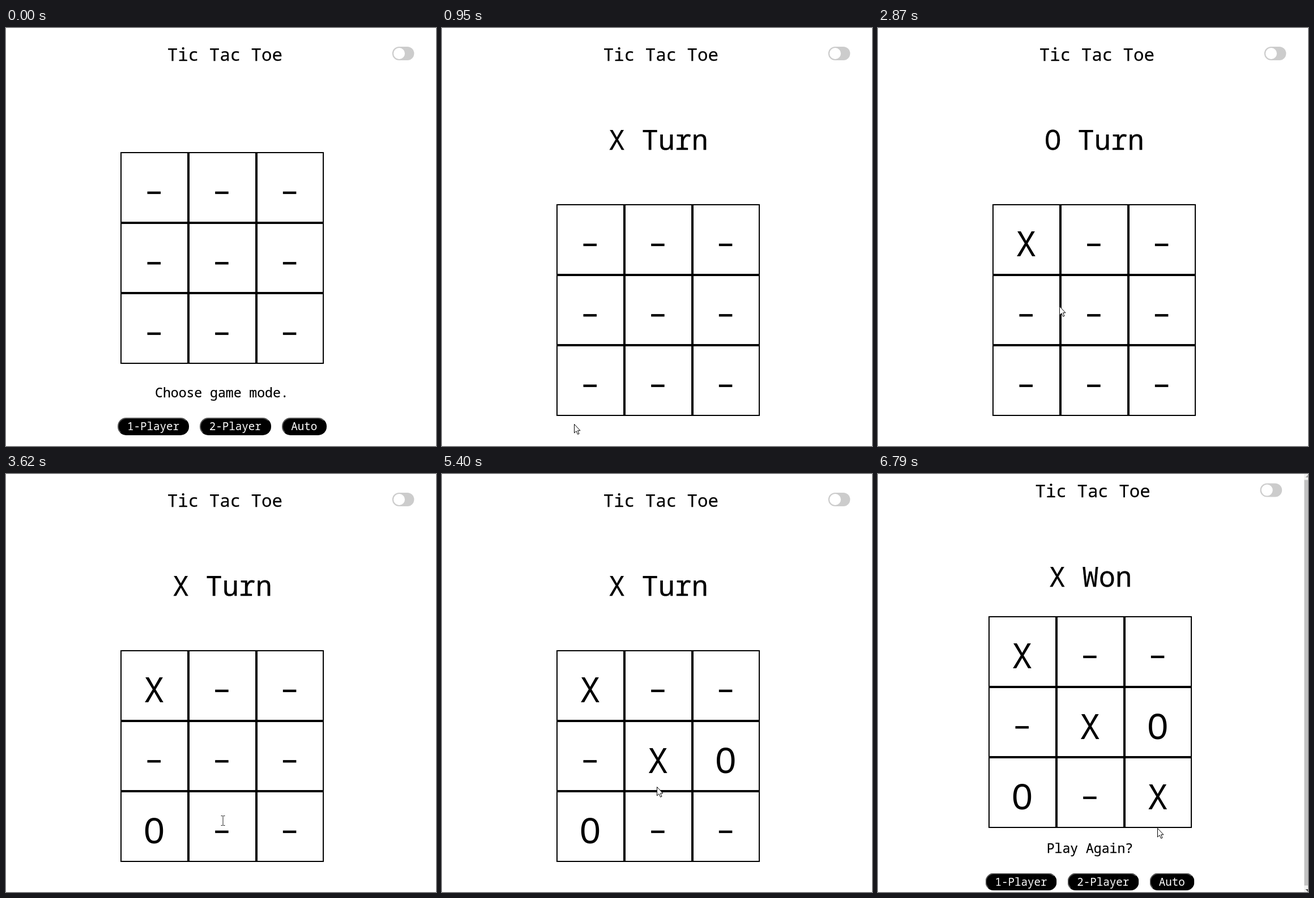
Animation of 759x738 px, one loop 8000 ms. Source, as an HTML page:

```html
<!DOCTYPE html>
<html lang="en">
<head>
<meta charset="utf-8">
<title>Tic Tac Toe</title>
<style>
  html, body { margin: 0; width: 100%; height: 100%; overflow: hidden; background: #fff; }
  svg { position: absolute; left: 0; top: 0; display: block; }
  text, .btn { font-family: "Roboto Mono", "Noto Sans Mono", monospace; white-space: pre; }
  .medium { font-weight: 500; stroke: #000; stroke-width: .25px; }
  #title { font-size: 30.8px; }
  #status { font-size: 48.8px; }
  #prompt { font-size: 23.1px; }
  .mark { font-size: 61.6px; text-anchor: middle; }
  #buttons { position: absolute; left: 0; top: 688px; }
  .btn {
    position: absolute; top: 0; box-sizing: border-box; height: 30.5px;
    border: 2px outset #000; border-radius: 15px; background: #000; color: #fff;
    font-size: 19.2px; line-height: 26.5px; text-align: center;
  }
</style>
</head>
<body>
<svg width="759" height="738" viewBox="0 0 759 738">
  <g id="header">
    <text id="title" class="medium" x="284.8" y="57.5">Tic Tac Toe</text>
    <rect x="681.8" y="33" width="38.6" height="24" rx="12" fill="#ccc"/>
    <circle cx="694" cy="45" r="10" fill="#fff"/>
  </g>
  <text id="status" class="medium" y="215"></text>
  <g id="board"></g>
  <text id="prompt" class="medium"></text>
  <g id="scrollbar">
    <rect x="752" width="7" height="738" fill="#f1f1f1"/>
    <rect x="752.5" y="10.5" width="6.5" height="716" fill="#c1c1c1"/>
    <path d="M754.5 6L759 1.5V6Z" fill="#a3a3a3"/>
    <path d="M754.5 733L759 737.5V733Z" fill="#505050"/>
  </g>
</svg>
<div id="buttons">
  <div class="btn" style="left:197px;width:126px">1-Player</div>
  <div class="btn" style="left:342px;width:125.5px">2-Player</div>
  <div class="btn" style="left:486.5px;width:79.5px">Auto</div>
</div>
<svg width="759" height="738" viewBox="0 0 759 738">
  <g id="cursor">
    <circle id="glow" r="11.7" fill="#ff0" opacity=".52"/>
    <path id="arrow" d="M.5 .5V16L4 12.7L6.6 18.4L9 17.3L6.5 11.8H11Z" fill="#fff" stroke="#000"/>
    <path id="beam" d="M-1.5 -7.5H1.5M5.5 -7.5H2.5M2 -7V9M-1.5 9.5H1.5M5.5 9.5H2.5" fill="none" stroke="#222"/>
  </g>
</svg>
<script>
const LOOP = 8000, START = 950, END = 6790;
const COL = 119.67, ROW = 124.4, BASELINE = 92.3;
const NS = "http://www.w3.org/2000/svg";
const $ = id => document.getElementById(id);

// Cell index, time and mark of each turn
const turns = [
  [0, 2280, "X"], [6, 3290, "O"], [4, 4410, "X"], [5, 5400, "O"], [8, END, "X"]
];
// Time span in which the pointer is pressed
const clicks = [[820, START], [2140, 2280], [4270, 4410], [6650, END]];
// First step, last step, number of steps, end point
const moves = [
  [420, 680, 5, 233, 698.5],
  [1280, 2010, 11, 262.5, 390.5],
  [2540, 3220, 11, 396, 622],
  [3620, 3620, 1, 380.5, 611],
  [3690, 4210, 9, 374, 497],
  [4740, 5330, 9, 379, 551.5],
  [5860, 6260, 7, 492.5, 624.5]
];

function add(tag, attrs, parent) {
  const el = document.createElementNS(NS, tag);
  for (const key in attrs) el.setAttribute(key, attrs[key]);
  return parent.appendChild(el);
}

function buildBoard() {
  const board = $("board");
  for (const [pos, size] of [[0, 2], [118, 4], [238, 4], [357, 2]])
    add("rect", { x: 202 + pos, y: 0, width: size, height: 374 }, board);
  for (const [pos, size] of [[0, 2], [123, 4], [247, 4], [372, 2]])
    add("rect", { x: 202, y: pos, width: 359, height: size }, board);
  return Array.from({ length: 9 }, (_, i) => {
    const x = 261.5 + i % 3 * COL, y = BASELINE + Math.floor(i / 3) * ROW;
    return {
      dash: add("rect", { x: x - 12, y: y - 22.6, width: 23.5, height: 4.4 }, board),
      mark: add("text", { class: "mark", x, y }, board)
    };
  });
}

const cells = buildBoard();
const show = (el, on) => { el.style.display = on ? "" : "none"; };
const shift = (el, x, y) => el.setAttribute("transform", `translate(${x} ${y})`);
const smooth = u => u * u * (3 - 2 * u);

function pointer(t) {
  let x = 421, y = 738;
  for (const [from, to, steps, endX, endY] of moves) {
    if (t < from) break;
    const gap = steps > 1 ? (to - from) / (steps - 1) : 1;
    const step = Math.min(steps, Math.floor((t - from) / gap + 1e-6) + 1);
    const u = smooth(step / steps);
    x += (endX - x) * u;
    y += (endY - y) * u;
  }
  return [x, y];
}

function overText(x, y, top) {
  const col = Math.floor((x - 202) / COL), row = Math.floor((y - top) / ROW);
  if (col < 0 || col > 2 || row < 0 || row > 2) return false;
  const dx = x - 261.5 - col * COL, dy = y - top - BASELINE - row * ROW;
  return Math.abs(dx) < 18.5 && dy > -64.6 && dy < 16.7;
}

function render(t) {
  const started = t >= START, won = t >= END;
  const top = won ? 251 : started ? 311 : 219;
  const dx = won ? -7.3 : 0, dy = won ? -16.4 : 0;

  shift($("header"), dx, dy);
  shift($("board"), won ? -7 : 0, top);

  const played = turns.filter(turn => t >= turn[1]);
  cells.forEach((cell, i) => {
    const turn = played.find(p => p[0] === i);
    cell.mark.textContent = turn ? turn[2] : "";
    show(cell.dash, !turn);
  });

  const status = $("status");
  const next = played.length % 2 ? "O" : "X";
  status.textContent = won ? "X Won" : started ? next + " Turn" : "";
  status.setAttribute("x", won ? 301.8 : 294);
  status.setAttribute("y", 215 + dy);

  const prompt = $("prompt");
  prompt.textContent = won ? "Play Again?" : started ? "" : "Choose game mode.";
  prompt.setAttribute("x", won ? 297.7 : 263.1);
  prompt.setAttribute("y", won ? 669 : 652);

  show($("buttons"), won || !started);
  $("buttons").style.transform = won ? "translate(-7.5px, 16.5px)" : "none";
  show($("scrollbar"), won);

  const [x, y] = pointer(t);
  const beam = overText(x, y, top);
  show($("cursor"), t >= moves[0][0]);
  shift($("cursor"), Math.round(x), Math.round(y));
  show($("beam"), beam);
  show($("arrow"), !beam);
  show($("glow"), clicks.some(([from, to]) => t >= from && t < to));
}

const origin = performance.now();
function tick() {
  render((performance.now() - origin) % LOOP);
  requestAnimationFrame(tick);
}
tick();
</script>
</body>
</html>
```
